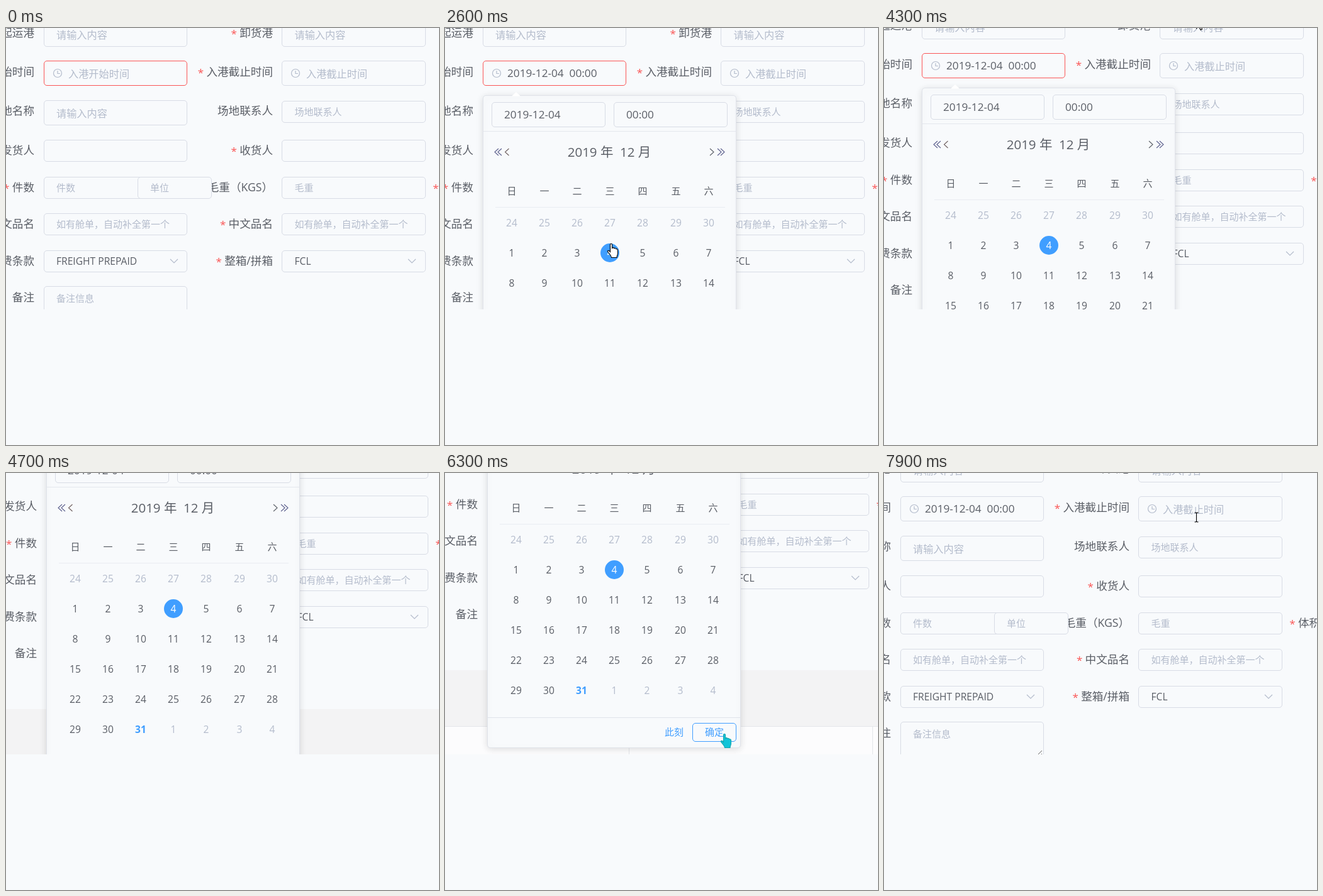
Animation, 688 px wide and 664 px high, one loop 8000 ms. Source, as an HTML page with a canvas:

```html
<!DOCTYPE html>
<html lang="zh-CN">
<head>
<meta charset="utf-8">
<title>Date picker</title>
<style>
  html, body { margin: 0; width: 100%; height: 100%; overflow: hidden; background: #f8fafc; }
  canvas { display: block; }
</style>
</head>
<body>
<canvas width="688" height="448"></canvas>
<script>
const c = document.querySelector('canvas').getContext('2d');
const BG = '#f8fafc', LINE = '#d8dce5', INK = '#5a5e66', PALE = '#b4bccc', RED = '#fa5555', BLUE = '#409eff';
const FONT = '"Open Sans", "Noto Sans CJK SC", "Noto Sans CJK", sans-serif';

const clamp = v => Math.max(0, Math.min(1, v));

// Linear interpolation through rows of [time, x, y].
function follow(keys, t) {
  if (t <= keys[0][0]) return keys[0].slice(1);
  for (let i = 1; i < keys.length; i++) {
    const a = keys[i - 1], b = keys[i];
    if (t <= b[0]) {
      const p = (t - a[0]) / (b[0] - a[0]);
      return [Math.round(a[1] + (b[1] - a[1]) * p), Math.round(a[2] + (b[2] - a[2]) * p)];
    }
  }
  return keys[keys.length - 1].slice(1);
}

// y is the visual middle of the text; the baseline sits on a whole pixel.
function text(s, x, y, size, color = INK, align = 'left', weight = 400) {
  c.font = `${weight} ${size}px ${FONT}`;
  c.textAlign = align;
  c.fillStyle = color;
  c.fillText(s, x, Math.round(y + size * 0.36));
}

function path(points, color, width = 1) {
  c.beginPath();
  points.forEach(([x, y]) => c.lineTo(x, y));
  c.strokeStyle = color;
  c.lineWidth = width;
  c.stroke();
}

function box(x1, y1, x2, y2, border = LINE) {
  c.beginPath();
  c.roundRect(x1 + 0.5, y1 + 0.5, x2 - x1 - 1, y2 - y1 - 1, 4.5);
  c.fillStyle = BG;
  c.fill();
  c.strokeStyle = border;
  c.lineWidth = 1;
  c.stroke();
}

function label(s, right, y, required) {
  text(s, right, y, 17.6, INK, 'right');
  if (required) text('*', right - c.measureText(s).width - 9, y + 1, 17, RED, 'center');
}

function clock(x, y) {
  c.beginPath();
  c.arc(x, y, 6.5, 0, 7);
  c.strokeStyle = PALE;
  c.lineWidth = 1.2;
  c.stroke();
  path([[x, y - 4], [x, y + 0.5], [x + 4, y + 0.5]], PALE, 1.2);
}

const chevronDown = (x, y) => path([[x - 6, y - 3], [x, y + 3], [x + 6, y - 3]], PALE, 1.2);

const rows = [
  ['起运港', '卸货港', 8, 1, 1],
  ['入港开始时间', '入港截止时间', 70, 1, 1],
  ['场地名称', '场地联系人', 132, 0, 0],
  ['发货人', '收货人', 195, 1, 1],
  ['件数', '毛重（KGS）', 254, 1, 1],
  ['英文品名', '中文品名', 312, 1, 1],
  ['运费条款', '整箱/拼箱', 371, 1, 1],
  ['备注', '', 429, 0, 0]
];

function form(t, picked) {
  for (const [left, right, y, starLeft, starRight] of rows) {
    label(left, 45, y, starLeft);
    label(right, 424, y, starRight);
  }
  text('*', 683, 255, 17, RED, 'center');
  text('体积（CBM）', 692, 254, 17.6);

  const pair = (y1, y2, leftBorder, yRight = y1, y2Right = y2) => {
    box(60, y1, 288, y2, leftBorder);
    box(438, yRight, 667, y2Right);
  };
  const hints = (left, right, y, size = 15) => {
    text(left, 80, y, size, PALE);
    text(right, 458.5, y, size, PALE);
  };

  pair(-10, 30);
  hints('请输入内容', '请输入内容', 11, 16.2);

  pair(52, 92, t < 6500 ? RED : LINE);
  clock(82, 72);
  clock(460, 72);
  if (picked) text('2019-12-04  00:00', 99, 72, 17.2);
  else text('入港开始时间', 99, 73, 16.2, PALE);
  text('入港截止时间', 477, 73, 16.2, PALE);
  if (!picked && t >= 700 && Math.floor((t - 600) / 500) % 2 === 0) {
    c.fillStyle = '#222';
    c.fillRect(99, 62, 1, 21);
  }

  pair(115, 155, LINE, 116, 151);
  text('请输入内容', 80, 136, 16.2, PALE);
  text('场地联系人', 458.5, 134, 15, PALE);

  pair(178, 213);
  pair(237, 272);
  box(209, 237, 327, 272);
  hints('件数', '毛重', 255);
  text('单位', 229, 255, 15, PALE);

  pair(295, 330);
  hints('如有舱单，自动补全第一个', '如有舱单，自动补全第一个', 313);

  pair(354, 389);
  text('FREIGHT PREPAID', 80, 371.5, 15.6);
  text('FCL', 458.5, 371.5, 15.6);
  chevronDown(267, 371);
  chevronDown(645, 371);

  box(60, 411, 288, 470);
  text('备注信息', 80, 431, 15, PALE);
  path([[275, 467], [285, 457]], '#666');
  path([[280, 467], [285, 462]], '#666');

  c.fillStyle = '#f3f3f4';
  c.fillRect(-60, 518, 860, 89);
  c.fillStyle = '#fcfcfd';
  c.fillRect(-60, 607, 860, 80);
  c.fillStyle = '#e4e6ea';
  c.fillRect(-60, 607, 860, 1);
  c.fillRect(285, 607, 1, 80);
  c.fillRect(672, 607, 1, 80);
}

function angle(x, dir, color) {
  path([[x + 3 * dir, 192], [x - 3 * dir, 197.5], [x + 3 * dir, 203]], color, 1.1);
}

function calendar(t, picked) {
  c.save();
  c.shadowColor = 'rgba(0,0,0,.12)';
  c.shadowBlur = 12;
  c.shadowOffsetY = 2;
  box(60, 107, 463, 642, '#dfe2e9');
  c.restore();
  c.beginPath();
  [[106, 108.5], [113, 102], [120, 108.5]].forEach(([x, y]) => c.lineTo(x, y));
  c.fillStyle = '#fff';
  c.fill();

  box(74, 118, 255, 158);
  box(268, 118, 449, 158);
  text(picked ? '2019-12-04' : '选择日期', 94, 138, picked ? 17.2 : 16.2, picked ? INK : PALE);
  text(picked ? '00:00' : '选择时间', 288, 138, picked ? 17.2 : 16.2, picked ? INK : PALE);
  path([[61, 164.5], [462, 164.5]], '#e4e7ed');

  text('2019 年  12 月', 261, 198, 20.5, INK, 'center');
  angle(82, 1, '#5a5e8c');
  angle(87, 1, '#5a5e8c');
  angle(98.5, 1, '#6d5e5e');
  angle(424, -1, INK);
  angle(436, -1, '#5a5e8c');
  angle(441, -1, '#5a5e8c');

  const column = i => Math.round(106 + i * 52.1);
  [...'日一二三四五六'].forEach((day, i) => text(day, column(i), 260, 15, INK, 'center'));
  path([[80, 285.5], [445, 285.5]], '#e9ecf2');

  for (let i = 0; i < 42; i++) {
    const x = column(i % 7), y = 310 + 48 * Math.floor(i / 7);
    const day = i < 7 ? 24 + i : (i - 7) % 31 + 1;
    const inMonth = i > 6 && i < 38, today = i === 37, chosen = picked && i === 10;
    if (chosen) {
      c.beginPath();
      c.arc(x, y, 15, 0, 7);
      c.fillStyle = BLUE;
      c.fill();
    }
    const color = chosen ? '#fff' : today ? BLUE : inMonth ? INK : PALE;
    text(day, x, y, 15.6, color, 'center', today ? 700 : 400);
  }

  path([[61, 593.5], [462, 593.5]], '#dfe3ea');
  const hover = t >= 6200;
  text('此刻', 342, 617, 15, BLUE);
  box(386, 602, 456, 632, hover ? BLUE : LINE);
  text('确定', 421, 617, 15, hover ? BLUE : INK, 'center');
}

const shapes = {
  arrow: 'M0 0V16L4 12.5L6.5 18.5L9 17.5L6.5 11.5H11.5Z',
  hand: 'M0 1.5C0 -.5 3 -.5 3 1.5V7C4 5.5 6 6 6.3 7.5C7.5 6.5 9 7 9.3 8.5C10.5 8 12 8.5 12 10.5V15C12 18 10.5 19 10.5 22H2C1.5 18 -2 16 -4 12.5C-4.5 10.5 -2 10 0 13Z',
  beam: 'M-3 -7.5H-1L0 -6.5L1 -7.5H3M0 -6.5V6.5M-3 7.5H-1L0 6.5L1 7.5H3'
};

function pointer(kind, x, y, fill, stroke) {
  const shape = new Path2D(shapes[kind]);
  c.save();
  c.translate(x + 0.5, y + 0.5);
  c.lineWidth = 1.1;
  c.strokeStyle = stroke;
  if (kind !== 'beam') {
    c.fillStyle = fill;
    c.fill(shape);
  }
  c.stroke(shape);
  c.restore();
}

const pan = [
  [4100, 0, 0], [4300, 0, -12], [4600, 3, -128], [5100, 7, -196], [5200, 7, -204],
  [7100, 7, -204], [7400, 11, -49], [7700, -34, -15]
];
const route = [
  [100, 496, 82], [300, 380, 102], [500, 209, 80], [600, 209, 80], [900, 225, 140], [1500, 258, 365],
  [1700, 262, 343], [2600, 262, 343], [3100, 330, 325], [3600, 470, 190], [4000, 496, -14],
  [5300, 496, -22], [5700, 635, 150], [6200, 442, 415], [6600, 442, 415], [7000, 493, -6],
  [7800, 493, -6], [7900, 496, 70]
];
// Pointer kinds, each from its start time.
const kinds = [
  [0, ''], [100, 'beam'], [200, 'arrow'], [500, 'beam'], [800, 'arrow'], [1200, 'hand'], [3400, 'arrow'],
  [4400, ''], [5400, 'arrow'], [6200, 'hand'], [6600, ''], [7000, 'beam'], [7200, ''], [7900, 'beam']
];

function draw(t) {
  const picked = t >= 2300;
  const open = Math.min(clamp((t - 600) / 300), clamp((6600 - t) / 300));
  c.fillStyle = BG;
  c.fillRect(0, 0, 688, 448);

  c.save();
  c.translate(...follow(pan, t));
  form(t, picked);
  if (open) {
    c.globalAlpha = open;
    c.translate(0, 107 * (1 - open));
    c.scale(1, open);
    calendar(t, picked);
  }
  c.restore();

  const kind = kinds.filter(k => k[0] <= t).pop()[1];
  const tinted = kind === 'hand' && t > 6000;
  if (kind) pointer(kind, ...follow(route, t), tinted ? '#12c4d8' : '#fff', tinted ? '#14a5ae' : '#000');
}

function tick() {
  draw(Math.floor(performance.now() % 8000 / 100) * 100);
  requestAnimationFrame(tick);
}
tick();
</script>
</body>
</html>
```
